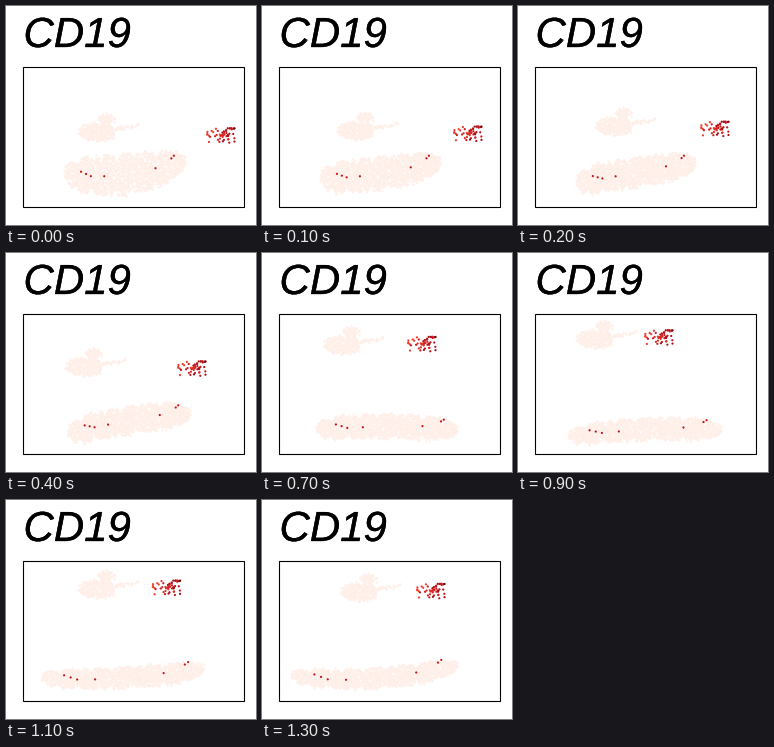
These frames come from a looping animation (250x219 px, 1500 ms). A matplotlib script:

```python
import numpy as np
import matplotlib.pyplot as plt
from matplotlib.animation import FuncAnimation
from matplotlib.patches import Rectangle
from matplotlib.patheffects import withStroke

W, H, DPI = 250, 219, 64
PX = 72 / DPI  # points per pixel
PINK = "#ffefe9"
REDS = ["#ef3b2c", "#dc2924", "#cb181d", "#b81419", "#a50f15", "#7a0510"]

# View angle for each 100 ms tick, in steps of 45 degrees
VIEWS = [0, .5, 1, 1, 1.5, 2, 2, 3, 3, 4, 4, 4.7, 4.7, 5, 5]

# Landmarks at views 0 to 5
BODY_X = [(58, 180), (58, 178), (65, 191), (54, 196), (50, 204), (29, 196)]
BODY_Y = [(167, 168, 155), (176, 166, 157), (183, 168, 164),
          (176, 173, 177), (183, 176, 177), (175, 178, 165)]
LOBE_X = [93, 98, 62, 82, 79, 99]
CORE_X = [218, 200, 178, 163, 144, 172]

# Lone positive cells: position along the body, pixels off its midline
STRAY_U = np.array([.14, .18, .22, .33, .75, .88, .9])
STRAY_DY = np.array([-3, -1, 1, 1, -1, -7, -9])

rng = np.random.default_rng(19)


def at(keys, t):
    """Landmark value at view t."""
    keys = np.asarray(keys, float)
    i = min(int(t), len(keys) - 2)
    return keys[i] + (keys[i + 1] - keys[i]) * (t - i)


def blob(n, power, rag):
    """Even points (u in 0..1, v in -1..1) inside a rounded, ragged shape."""
    k = np.arange(1, n + 1)
    u, v = k * .7548777 % 1, 2 * (k * .5698403 % 1) - 1
    taper = np.sqrt(1 - np.abs(2 * u - 1) ** power)
    wave = np.sin(29 * u + 2 * v) + .6 * np.sin(67 * u - v)
    keep = np.abs(v) < taper * (1 - rag * (1 - .6 * u) * wave ** 2)
    u, v = u[keep], v[keep]
    return u, v, rng.normal(0, .8, (len(u), 2))


def ellipse(pts, cx, cy, rx, ry):
    u, v, jitter = pts
    return np.column_stack([cx + rx * (2 * u - 1), cy + ry * v]) + jitter


def midline(u, t):
    x0, x1 = at(BODY_X, t)
    bend = np.polyfit([0, .5, 1], at(BODY_Y, t), 2)
    return x0 + (x1 - x0) * u, np.polyval(bend, u)


def body(pts, t):
    """A bent band, thinner to the right and as the view tilts."""
    u, v, jitter = pts
    x, y = midline(u, t)
    thick = (35 - 3 * t) * (1 - u) + (28 - 1.2 * t) * u
    thick += 11 * np.exp(-2 * t) * np.sin(np.pi * u)
    return np.column_stack([x, y + v * thick / 2]) + jitter


body_pts = blob(1650, 6, .2)
lobe_pts = blob(300, 2.6, .1)
bump_pts = blob(80, 2, .1)
tail_u = rng.random(24)
tail_off = rng.normal(0, 1, (24, 2))

cells = rng.uniform(-1, 1, (52, 2))
cells = np.sign(cells) * np.abs(cells) ** 1.35


def pale_points(t):
    tilt = np.cos(np.pi * t / 4)
    x, y = at(LOBE_X, t), 104 + 20 * tilt
    tail = np.column_stack([x + 16 + 24 * tail_u, y - 1 - 4 * tail_u])
    return np.vstack([body(body_pts, t),
                      ellipse(lobe_pts, x - 2, y + 2, 18, 9),
                      ellipse(bump_pts, x + 7, y - 11, 8, 6),
                      tail + tail_off])


def hot_points(t):
    x, y = midline(STRAY_U, t)
    strays = np.column_stack([x, y + STRAY_DY])
    core = [at(CORE_X, t), 106.5 + 22.5 * np.cos(np.pi * t / 4)]
    reach = np.where(cells < 0, [17, 7], [11, 8])
    return np.vstack([strays, core + cells * reach])


fig = plt.figure(figsize=(W / DPI, H / DPI), dpi=DPI, facecolor="white")
ax = fig.add_axes([0, 0, 1, 1])
ax.set(xlim=(0, W), ylim=(H, 0))
ax.axis("off")

ax.text(17.5, 41, "CD19", family="Liberation Sans", style="italic",
        size=42 * PX, va="baseline", color="black",
        path_effects=[withStroke(linewidth=.4, foreground="black")])
ax.add_patch(Rectangle((17.5, 61.5), 221, 140, fill=False, snap=False,
                       ec="black", lw=1.1 * PX))

# Expression rises towards the right of the cluster
level = (cells[:, 0] + 1) * 2 + rng.normal(.5, 1, len(cells))
tints = ["#c4161c"] * len(STRAY_U)
tints += [REDS[i] for i in np.clip(level, 0, len(REDS) - 1).astype(int)]

pale = ax.scatter(*pale_points(0).T, s=(2.4 * PX) ** 2, c=PINK, lw=0)
hot = ax.scatter(*hot_points(0).T, s=(2.2 * PX) ** 2, c=tints, lw=0)


def update(i):
    pale.set_offsets(pale_points(VIEWS[i]))
    hot.set_offsets(hot_points(VIEWS[i]))
    return pale, hot


anim = FuncAnimation(fig, update, frames=len(VIEWS), interval=100,
                     repeat=True, repeat_delay=0)
plt.show()
```
